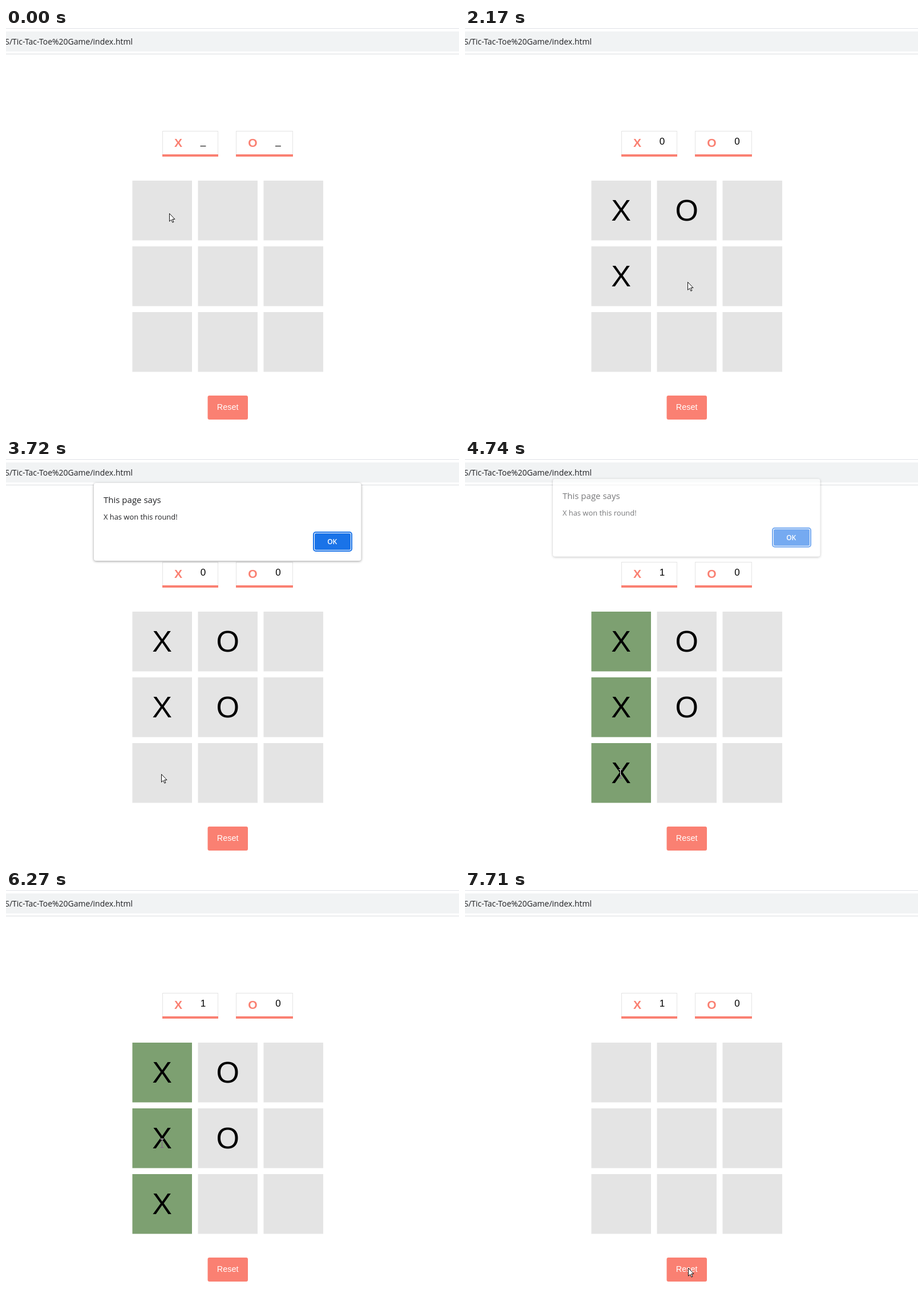
An HTML page for the animation above (8000 ms loop, 794 by 705 pixels).

```html
<!DOCTYPE html>
<html lang="en">
<head>
<meta charset="utf-8">
<title>Tic-Tac-Toe</title>
<style>
  html, body { margin: 0; width: 100%; height: 100%; overflow: hidden; background: #fff; }
  svg { display: block; width: 794px; height: 705px; }
  text { font-family: "Liberation Sans", Arial, sans-serif; }
  .ui { font-family: "Open Sans", "Noto Sans", sans-serif; fill: #202124; }
  .mid { text-anchor: middle; }
  .mark { font-size: 52px; }
  .player { font-size: 21px; font-weight: bold; fill: #fa8072; }
  .score { font-size: 17px; }
  #panel { filter: drop-shadow(0 1px 2px rgba(0,0,0,.4)); }
  #beam { mix-blend-mode: difference; }
</style>
</head>
<body>
<svg id="stage" viewBox="0 0 794 705">
  <rect width="794" height="705" fill="#fff"/>
  <rect width="794" height="1" fill="#dee1e6"/>
  <rect y="6" width="794" height="35" fill="#f1f3f4"/>
  <rect y="45" width="794" height="1" fill="#dadce0"/>
  <text class="ui" x="222" y="29" font-size="14" text-anchor="end">S/Tic-Tac-Toe%20Game/index.html</text>

  <g fill="none" stroke="#e4e4e4">
    <rect x="274.5" y="180.5" width="97" height="44"/>
    <rect x="403.5" y="180.5" width="99" height="44"/>
  </g>
  <path d="M274 221h98v4h-98zM403 221h100v4h-100z" fill="#fa8072"/>
  <text class="player mid" x="302" y="208">X</text>
  <text class="player mid" x="432.5" y="208">O</text>
  <text class="score mid" id="scoreX" x="345.5" y="204">_</text>
  <text class="score mid" id="scoreO" x="477" y="204">_</text>

  <g id="board"></g>

  <rect x="353.5" y="643" width="70.5" height="42" rx="3" fill="#fa8072"/>
  <text class="mid" x="388.6" y="668" font-size="14.4" fill="#fff">Reset</text>

  <g id="dialog">
    <rect id="panel" x="154" y="42" width="468.5" height="136" rx="4" fill="#fff"/>
    <text class="ui" x="171" y="77" font-size="15">This page says</text>
    <text class="ui" x="171" y="106" font-size="12.9">X has won this round!</text>
    <rect x="539" y="128" width="67" height="33" rx="4" fill="#fff" stroke="#1a73e8" stroke-width="2"/>
    <rect x="541" y="130" width="63" height="29" rx="2.5" fill="#1a73e8"/>
    <text class="ui mid" x="571.7" y="149" font-size="12" font-weight="600" style="fill:#fff">OK</text>
  </g>

  <circle id="glow" r="12.5" fill="#ff0" fill-opacity=".5"/>
  <path id="arrow" d="M.5 .5V14.3L3.7 11.3L5.9 16.2L7.9 15.3L5.8 10.5H10Z" fill="#fff" stroke="#111"/>
  <path id="beam" d="M-3 -7.5H3M-3 7.5H3M0 -7.5V7.5" fill="none" stroke="#fff"/>
</svg>
<script>
const LOOP = 8000, CLEAR = 7710, WIN = 4740;
const $ = id => document.getElementById(id);

// [start, end, x, y, x, y, ...]: pointer routes
const routes = [
  [270, 600, 286, 324, 406, 312],
  [1000, 1480, 406, 312, 274, 422, 282, 433],
  [2030, 2170, 282, 433, 336, 427, 390, 444],
  [2570, 3050, 390, 444, 266, 540, 272, 551],
  [5410, 6210, 273, 549, 266, 270, 234, 410, 250, 582, 273, 460],
  [6270, 7050, 273, 443, 264, 261, 391, 665],
  [7050, 7110, 391, 665, 391, 661]
];
const clicks = [[70, 270], [800, 1000], [1710, 1880], [2370, 2570], [3250, 3510], [7440, CLEAR]];
// cell index: [mark, time placed]
const moves = { 0: ["X", 270], 1: ["O", 1000], 3: ["X", 1880], 4: ["O", 2570], 6: ["X", WIN] };

function add(name, attrs) {
  const el = document.createElementNS("http://www.w3.org/2000/svg", name);
  for (const k in attrs) el.setAttribute(k, attrs[k]);
  return $("board").appendChild(el);
}

const cells = Array.from({ length: 9 }, (_, i) => {
  const x = 221.5 + i % 3 * 115, y = 267 + Math.floor(i / 3) * 115;
  const box = add("rect", { x, y, width: 104.5, height: 104.5 });
  const text = add("text", { x: x + 52.2, y: y + 70, class: "mark mid" });
  return { box, text };
});

const clamp = v => Math.max(0, Math.min(1, v));
const show = (el, on) => { el.style.display = on ? "" : "none"; };
const place = (el, x, y) => el.setAttribute("transform", `translate(${x} ${y})`);

function pointer(t) {
  const [start, end, ...pts] = routes.findLast(r => t >= r[0]) || routes[0];
  const steps = Math.round((end - start) / 67);
  const u = Math.floor(clamp((t - start) / (end - start)) * steps + 1e-6) / steps;
  const legs = pts.length / 2 - 1;
  const pos = u * u * (3 - 2 * u) * legs;
  const i = Math.min(legs - 1, Math.floor(pos)), f = pos - i;
  const mix = k => pts[2 * i + k] + (pts[2 * i + 2 + k] - pts[2 * i + k]) * f;
  return [mix(0), mix(1)];
}

function draw(t) {
  cells.forEach(({ box, text }, i) => {
    const [mark, at] = moves[i] || ["", 0];
    text.textContent = t >= at && t < CLEAR ? mark : "";
    box.setAttribute("fill", i % 3 === 0 && t >= WIN && t < CLEAR ? "#7da071" : "#e4e4e4");
  });
  $("scoreX").textContent = t < 270 ? "_" : t < WIN ? "0" : "1";
  $("scoreO").textContent = t < 270 ? "_" : "0";

  const opening = clamp((Math.floor((t - 3510) / 70) + 1) / 4);
  const closing = clamp((Math.floor((t - 4670) / 67.5) + 1) / 5);
  const seen = opening * (1 - closing);
  show($("dialog"), seen > 0);
  $("dialog").setAttribute("opacity", seen);
  place($("dialog"), 0, -18 * (1 - seen));

  const [x, y] = pointer(t);
  const overText = t >= WIN && t < CLEAR && Math.abs(x - 273.5) < 18 &&
    [319, 434, 549].some(c => Math.abs(y - c) < 29);
  place($("arrow"), x, y);
  place($("beam"), Math.round(x) + .5, y);
  place($("glow"), x, y);
  show($("arrow"), !overText);
  show($("beam"), overText);
  show($("glow"), clicks.some(([a, b]) => t >= a && t < b));
}

const begin = performance.now();
function tick() {
  draw((performance.now() - begin) % LOOP);
  requestAnimationFrame(tick);
}
tick();
</script>
</body>
</html>
```
